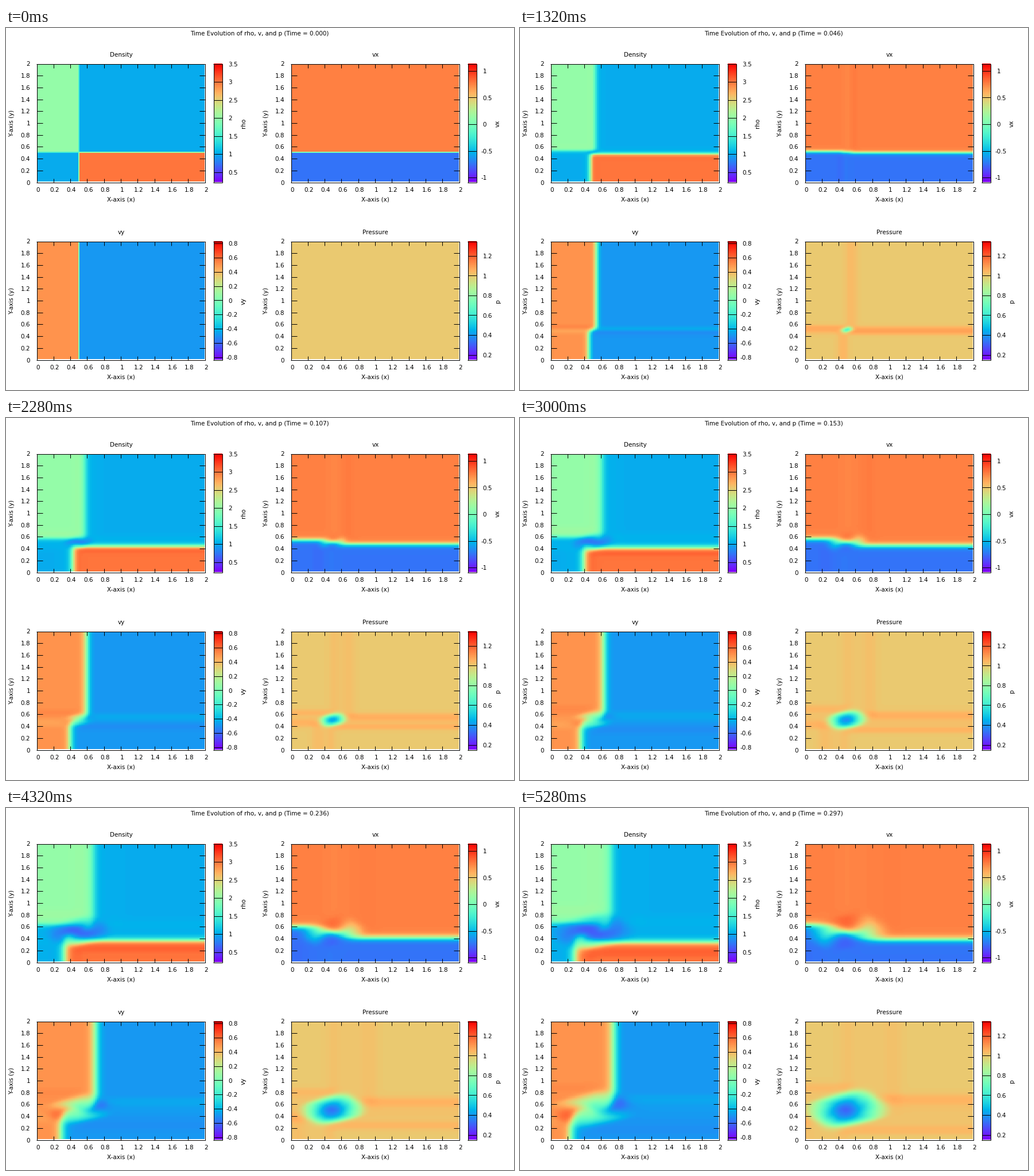
Recreate the animation shown at these times as a matplotlib script. Size 885 px wide and 632 px high, loop 5.4 s.

```python
import numpy as np
import matplotlib.pyplot as plt
from matplotlib.animation import FuncAnimation

W, H, DPI = 885, 632, 64
PX = 72 / DPI                      # points per pixel
FONT = 10.4 * PX
FRAMES, INTERVAL = 45, 120
N, SIZE, GAMMA = 100, 2.0, 1.4
DX = SIZE / N
PLOT_W, PLOT_H = 293, 207

plt.rcParams["font.family"] = "DejaVu Sans"


# ---- gas dynamics: four-quadrant Riemann problem, ----
# ---- minmod reconstruction, Rusanov flux, two-stage Runge-Kutta ----

def conserved(w):
    rho, vx, vy, p = w
    energy = p / (GAMMA - 1) + 0.5 * rho * (vx**2 + vy**2)
    return np.array([rho, rho * vx, rho * vy, energy])


def primitives(u):
    vx, vy = u[1] / u[0], u[2] / u[0]
    p = (GAMMA - 1) * (u[3] - 0.5 * u[0] * (vx**2 + vy**2))
    return np.array([u[0], vx, vy, p])


def initial_state():
    c = (np.arange(N) + 0.5) * DX
    x, y = np.meshgrid(c, c)
    left, low = x < 0.5, y < 0.5
    rho = np.where(low, np.where(left, 1.0, 3.0), np.where(left, 2.0, 1.0))
    vx = np.where(low, -0.75, 0.75)
    vy = np.where(left, 0.5, -0.5)
    return conserved([rho, vx, vy, np.ones_like(rho)])


def minmod(a, b):
    return np.where(a * b > 0, np.sign(a) * np.minimum(abs(a), abs(b)), 0)


def flux(w, normal):
    """Physical flux, conserved state and fastest wave speed."""
    u, v, p = conserved(w), w[normal], w[3]
    f = v * u
    f[normal] += p
    f[3] += v * p
    return f, u, abs(v) + np.sqrt(GAMMA * p / w[0])


def flux_difference(w, normal):
    """Net flux along the last axis; normal is the velocity index."""
    w = np.pad(w, ((0, 0), (0, 0), (2, 2)), mode="edge")
    d = np.diff(w)
    half = minmod(d[..., :-1], d[..., 1:]) / 2
    mid = w[..., 1:-1]
    fl, ul, sl = flux((mid + half)[..., :-1], normal)
    fr, ur, sr = flux((mid - half)[..., 1:], normal)
    return np.diff((fl + fr - np.maximum(sl, sr) * (ur - ul)) / 2)


def rate(u):
    w = primitives(u)
    fx = flux_difference(w, 1)
    fy = flux_difference(w.swapaxes(1, 2), 2).swapaxes(1, 2)
    return -(fx + fy) / DX


def step(u, dt):
    first = u + dt * rate(u)
    return (u + first + dt * rate(first)) / 2


def time_at(n):
    return 0.00388 * min(n, 10) + 0.007594 * max(n - 10, 0)


def corner_mean(a):
    return (a[:-1, :-1] + a[1:, :-1] + a[:-1, 1:] + a[1:, 1:]) / 4


def simulate():
    u = initial_state()
    history = []
    for n in range(FRAMES):
        history.append([corner_mean(a) for a in primitives(u)])
        span = time_at(n + 1) - time_at(n)
        parts = int(np.ceil(span / 0.004))
        for _ in range(parts):
            u = step(u, span / parts)
    return history


# ---- drawing in pixel coordinates ----

fig = plt.figure(figsize=(W / DPI, H / DPI), dpi=DPI, facecolor="white")
ax = fig.add_axes([0, 0, 1, 1])
ax.axis("off")


def text(x, y, s, ha="center", va="baseline", rotation=0):
    return ax.text(x, y, s, ha=ha, va=va, rotation=rotation,
                   fontsize=FONT, color="black")


def hline(y, x0, x1):
    ax.hlines(y, x0, x1, color="black", lw=PX)


def vline(x, y0, y1):
    ax.vlines(x, y0, y1, color="black", lw=PX)


def box(l, r, t, b):
    for y in (t, b):
        hline(y, l - 0.5, r + 0.5)
    for x in (l, r):
        vline(x, t, b)


def image(data, extent, vmin, vmax):
    return ax.imshow(data, extent=extent, origin="lower", aspect="auto",
                     cmap="rainbow", vmin=vmin, vmax=vmax,
                     interpolation="nearest", zorder=0)


def color_bar(l, t, b, vmin, vmax, ticks, name):
    r = l + 15
    image(np.linspace(vmin, vmax, 207)[:, None], (l, r, b, t), vmin, vmax)
    box(l, r, t, b)
    for v in ticks:
        y = b - (v - vmin) / (vmax - vmin) * (b - t)
        hline(y, l, r)
        text(r + (7.5 if v < 0 else 11), y + 4.2, f"{v:g}", ha="left")
    text(l + 52.5, (t + b) / 2 + 0.5, name, va="center", rotation=90)


def panel(l, t, title, name, vmin, vmax, ticks):
    r, b = l + PLOT_W, t + PLOT_H
    mx, my = PLOT_W / N / 2, PLOT_H / N / 2
    im = image(np.zeros((N - 1, N - 1)), (l + mx, r - mx, b - my, t + my),
               vmin, vmax)
    box(l, r, t, b)
    for i in range(11):
        x, y = l + PLOT_W * i / 10, b - PLOT_H * i / 10
        label = f"{i / 5:g}"
        vline(x, t, t + 7)
        vline(x, b - 7, b)
        hline(y, l, l + 10)
        hline(y, r - 10, r)
        text(x + 2, b + 17, label)
        text(l - 11.5, y + 4, label, ha="right")
    text((l + r) / 2 + 0.5, t - 12.5, title)
    text((l + r) / 2 + 0.5, b + 32.5, "X-axis (x)")
    text(l - 43, (t + b) / 2, "Y-axis (y)", va="center", rotation=90)
    color_bar(r + 15, t, b, vmin, vmax, ticks, name)
    return im


def steps(lo, hi, by):
    return np.round(np.arange(lo, hi + by / 2, by), 3) + 0.0


panels = [
    panel(53.5, 62.5, "Density", "rho", 0.22, 3.5, steps(0.5, 3.5, 0.5)),
    panel(496.5, 62.5, "vx", "vx", -1.088, 1.131, steps(-1, 1, 0.5)),
    panel(53.5, 372.5, "vy", "vy", -0.84, 0.83, steps(-0.8, 0.8, 0.2)),
    panel(496.5, 372.5, "Pressure", "p", 0.148, 1.347, steps(0.2, 1.2, 0.2)),
]
heading = text(321.5, 13.3, "", ha="left")
ax.set_xlim(0, W)
ax.set_ylim(H, 0)

history = simulate()


def draw(n):
    for im, field in zip(panels, history[n]):
        im.set_data(field)
    heading.set_text(
        f"Time Evolution of rho, v, and p (Time = {time_at(n):.3f})")
    return panels + [heading]


anim = FuncAnimation(fig, draw, frames=FRAMES, interval=INTERVAL,
                     repeat=True, repeat_delay=0, blit=False)
plt.show()
```
